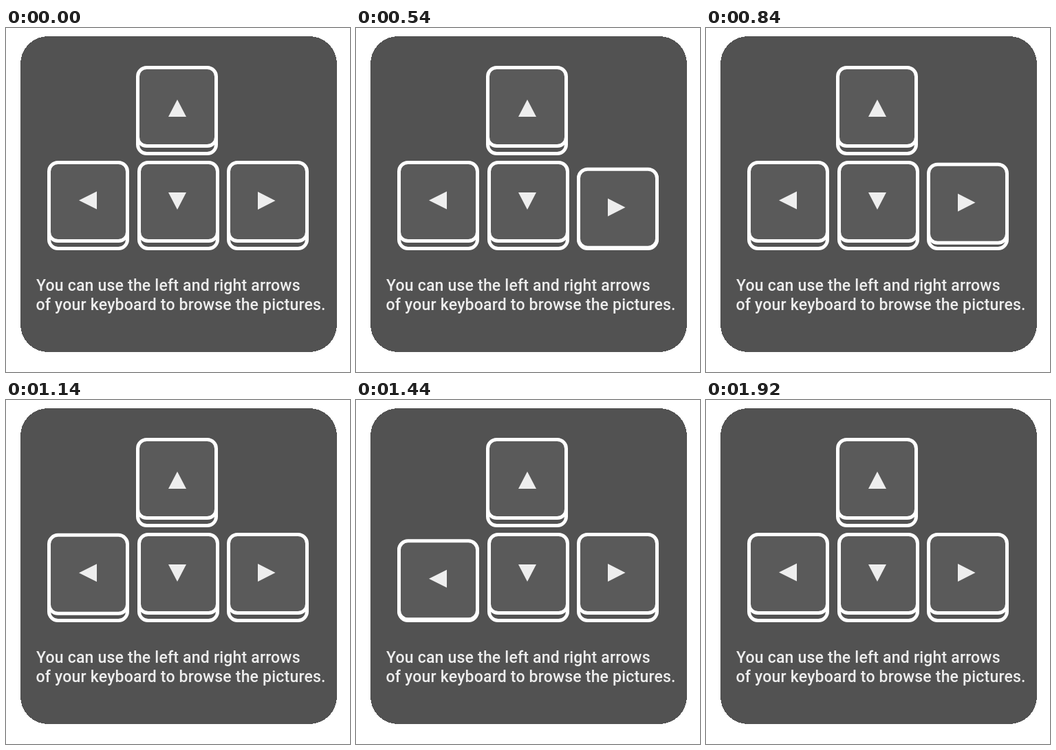
An HTML page that plays this animation: 500 by 500 pixels, repeating every 2.07 s.

```html
<!DOCTYPE html>
<html lang="en">
<head>
<meta charset="utf-8">
<style>
  html, body { margin: 0; height: 100%; overflow: hidden; background: #fff; }
  svg { display: block; width: 100%; height: 100%; }
  .key rect { width: 114px; height: 114px; rx: 13px; stroke: #fff; stroke-width: 5px; }
  .base { fill: #525252; }
  .cap rect { fill: #5a5a5a; }
  .cap path { fill: #eee; }
  text { font: 500 23px Roboto, sans-serif; letter-spacing: .2px; fill: #eee; }
</style>
</head>
<body>
<svg viewBox="0 0 500 500">
  <rect x="21" y="12" width="460" height="459" rx="40" fill="#525252" shape-rendering="crispEdges"/>
  <g id="keys"></g>
  <text x="44" y="382">You can use the left and right arrows</text>
  <text x="43.5" y="410">of your keyboard to browse the pictures.</text>
</svg>
<script>
const LOOP = 2070, STEP = 30, DEPTH = 11;

// Adds a key whose outline starts at (x, y) and returns its movable cap.
function addKey(x, y, arrow) {
  const key = document.createElementNS("http://www.w3.org/2000/svg", "g");
  key.setAttribute("class", "key");
  key.innerHTML = `<rect class="base" x="${x}" y="${y + DEPTH}"/>
    <g class="cap"><rect x="${x}" y="${y}"/><path d="${arrow}"/></g>`;
  document.getElementById("keys").append(key);
  return key.lastElementChild;
}

addKey(191.5, 57.5, "M249 104L262 129H236Z");
addKey(193.5, 195.5, "M236 239H262L249 264Z");
const left = addKey(62.5, 195.5, "M106 250.5L132 237.5V263.5Z");
const right = addKey(323.5, 195.5, "M391.5 251L366 238V264Z");

// Linear press from start to peak, then linear release until end.
function press(cap, t, start, peak, end) {
  const k = Math.min((t - start) / (peak - start), (end - t) / (end - peak));
  cap.setAttribute("transform", `translate(0 ${DEPTH * Math.max(0, k)})`);
}

function draw(now) {
  const t = Math.floor(now % LOOP / STEP) * STEP;
  press(right, t, 0, 480, 960);
  press(left, t, 1110, 1500, 1920);
  requestAnimationFrame(draw);
}
draw(0);
</script>
</body>
</html>
```
